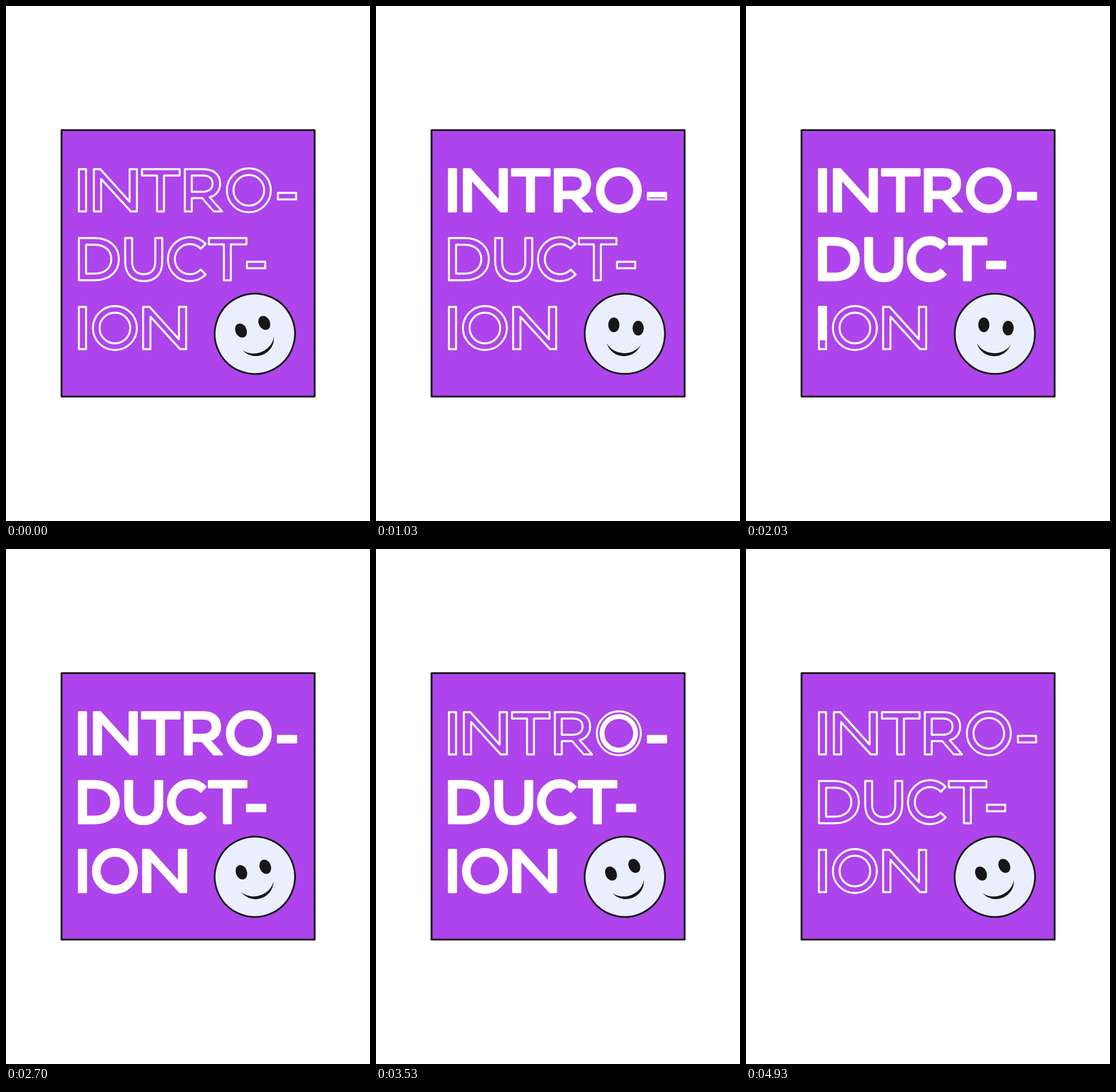
Animation, 629 px wide and 890 px high, one loop 5.01 s. Source, as an HTML page with a canvas:

```html
<!DOCTYPE html>
<html lang="en">
<head>
<meta charset="utf-8">
<title>Introduction</title>
<style>
html, body { margin: 0; width: 100%; height: 100%; overflow: hidden; background: #fff; }
canvas { display: block; }
</style>
</head>
<body>
<canvas id="stage" width="629" height="890" role="img" aria-label="INTRO-DUCT-ION"></canvas>
<script>
const ctx = document.getElementById('stage').getContext('2d');
const LOOP = 5010, LINE = 3.4, CAP = 73;
const INK = '#171717', PURPLE = '#ae44eb', PALE = '#ebeffd';
const R_OUT = 38, R_IN = 26.5;

// Outlines on a 73px cap height, with x measured on the stage
const shapes = {
  I: 'M126 0h12.4v73h-12.4z',
  N: 'M151.8 0H163L213.6 56V0H226.2V73H215.6L164.4 17V73H151.8z',
  T: 'M235 0H300V11H273V73H261V11H235z',
  R: 'M309 0H341C359 0 370 9 370 25C370 37 363 45.5 352 48.5L373.5 73H359L339 50H321V73H309z' +
     'M321 11V39H340C350 39 357 34 357 25C357 16 351 11 340 11z',
  D: 'M126 0H153C179 0 195 15 195 36.5S179 73 153 73H126z' +
     'M138.4 11.5V61.5H153C171 61.5 182 51 182 36.5S171 11.5 153 11.5z',
  U: 'M206 0H218V41C218 55 226 62.5 238 62.5S258 55 258 41V0H270V41C270 63 257 74.5 238 74.5S206 63 206 41z',
  C: 'M345 10A38 38 0 1 0 345 63L336.5 54.5A26 26 0 1 1 336.5 18.5z',
  '-': 'M469.8 41H501.4V52.2H469.8z'
};
const ring = r => {
  const p = new Path2D();
  p.arc(419.6, 36.5, r, 0, 7);
  p.closePath();
  p.moveTo(419.6 + R_IN, 36.5);
  p.arc(419.6, 36.5, R_IN, 0, 7);
  return p;
};

// Each row: baseline box top, [letter, x shift], then emptying start, stagger and length
const rows = [
  { y: 282, glyphs: [['I', 0], ['N', 0], ['T', 0], ['R', 0], ['O', 0], ['-', 0]], out: [2720, 190, 170] },
  { y: 401, glyphs: [['D', 0], ['U', 0], ['C', 0], ['T', 115.5], ['-', -53.4]], out: [3830, 100, 160] },
  { y: 520, glyphs: [['I', 0], ['O', -231.4], ['N', 85.2]], out: [4275, 100, 250] }
];
const FILL_START = 85, FILL_TIME = 1000 / 6;

const letters = rows.flatMap(row => row.glyphs.map(([char, dx], i) => {
  const [start, gap, length] = row.out;
  return {
    char, dx, y: row.y,
    path: char === 'O' ? ring(R_OUT) : new Path2D(shapes[char]),
    emptyAt: start + i * gap, emptyTime: length
  };
}));
letters.forEach((l, i) => l.fillAt = FILL_START + i * FILL_TIME);

const ramp = (t, start, length) => Math.min(1, Math.max(0, (t - start) / length));
const ease = p => (1 - Math.cos(Math.PI * p)) / 2;

function drawLetter(l, t) {
  const amount = ramp(t, l.fillAt, FILL_TIME) - ramp(t, l.emptyAt, l.emptyTime);
  ctx.save();
  ctx.translate(l.dx, l.y);
  ctx.fillStyle = ctx.strokeStyle = '#fff';
  ctx.lineWidth = LINE;
  ctx.lineJoin = 'round';
  ctx.stroke(l.path);
  if (amount > 0) {
    if (l.char === 'O') {
      ctx.fill(ring(R_IN + (R_OUT - R_IN) * amount), 'evenodd');
    } else {
      const [top, bottom] = l.char === '-' ? [41, 52.2] : [0, CAP + 1.5];
      const from = top + LINE / 2, to = bottom - LINE / 2;
      const level = amount === 1 ? bottom : from + (to - from) * amount;
      ctx.beginPath();
      ctx.rect(100, top - 2, 430, level - top + 2);
      ctx.clip();
      ctx.fill(l.path, 'evenodd');
    }
  }
  ctx.restore();
}

const smile = new Path2D('M-31.5 16C-22 45.5 17 46 27.5 18.5C16 38 -18 39.5 -31.5 16z');

function drawFace(t) {
  const turn = ease(ramp(t, 0, 1000)) - ease(ramp(t, 2000, 1000));
  ctx.save();
  ctx.translate(430, 566.5);
  ctx.rotate(-26 * (1 - turn) * Math.PI / 180);
  ctx.fillStyle = PALE;
  ctx.strokeStyle = INK;
  ctx.lineWidth = 3;
  ctx.beginPath();
  ctx.arc(0, 0, 69.3, 0, 7);
  ctx.fill();
  ctx.stroke();
  ctx.fillStyle = INK;
  for (const [x, y] of [[-19, -15.5], [23, -9.8]]) {
    ctx.beginPath();
    ctx.ellipse(x, y, 9.7, 12.7, 0, 0, 7);
    ctx.fill();
  }
  ctx.fill(smile);
  ctx.restore();
}

function draw(t) {
  ctx.fillStyle = '#fff';
  ctx.fillRect(0, 0, 629, 890);
  ctx.fillStyle = PURPLE;
  ctx.strokeStyle = INK;
  ctx.lineWidth = 3.2;
  ctx.lineJoin = 'round';
  ctx.beginPath();
  ctx.rect(96, 214.5, 437.3, 460.5);
  ctx.fill();
  ctx.stroke();
  letters.forEach(l => drawLetter(l, t));
  drawFace(t);
}

// Twenty poses a second, held for 30 and 70 ms in turn
function pose(ms) {
  const step = 2 * Math.floor(ms / 100) + (ms % 100 >= 30 ? 1 : 0);
  return Math.min(step, 99) * 50;
}

const began = performance.now();
function tick() {
  draw(pose((performance.now() - began) % LOOP));
  requestAnimationFrame(tick);
}
tick();
</script>
</body>
</html>
```
